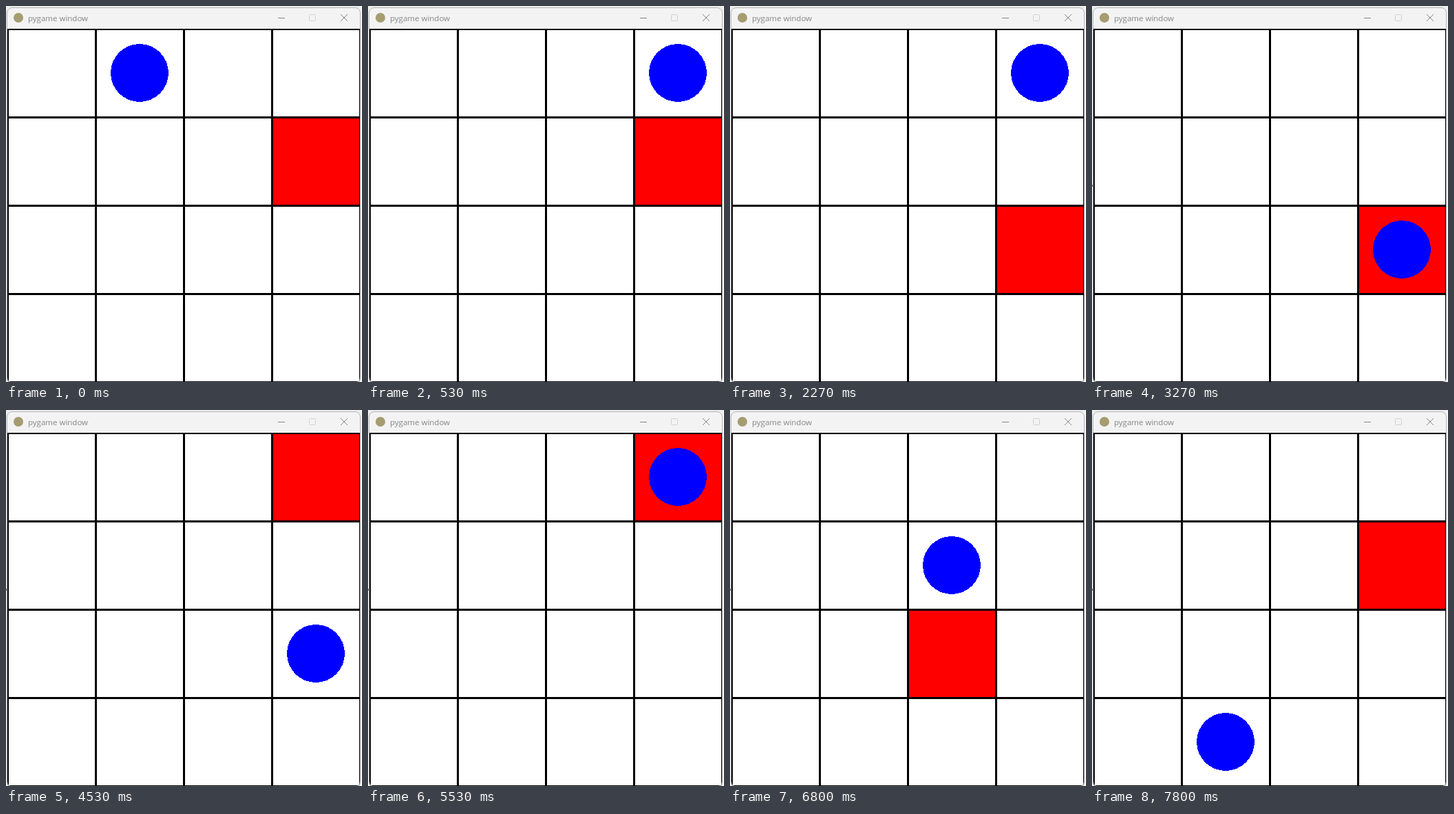
Write an HTML page that moves like this. It is 517 px wide and 545 px high and loops after 8000 ms.

```html
<!DOCTYPE html>
<html lang="en">
<head>
<meta charset="utf-8">
<title>pygame window</title>
<style>
  html, body { margin: 0; width: 100%; height: 100%; overflow: hidden; background: #ededed; }
  svg { display: block; width: 517px; height: 545px; }
  text { font: 11.5px "Open Sans", "Noto Sans", sans-serif; fill: #868686; }
  .crisp { shape-rendering: crispEdges; }
</style>
</head>
<body>
<svg viewBox="0 0 517 545">
  <defs>
    <clipPath id="frame"><rect x="1" y="2" width="514" height="544.5" rx="8"/></clipPath>
  </defs>
  <rect x="515" width="2" height="545" fill="#f5f5f5"/>
  <g clip-path="url(#frame)">
    <rect x="1" y="2" width="514" height="32" fill="#f3f3f3"/>
    <circle cx="18" cy="17" r="7" fill="#a59c70"/>
    <text x="32" y="22">pygame window</text>
    <g fill="none" stroke="#868686">
      <path d="M395 17.5h10"/>
      <rect x="440.5" y="12.5" width="9" height="9" rx="1" stroke="#d2d2d2"/>
      <path d="M486 12l10 10M496 12l-10 10"/>
    </g>
    <svg class="crisp" x="2" y="33" width="512" height="512">
      <rect width="512" height="512" fill="#fff"/>
      <rect id="goal" width="128" height="128" fill="#f00"/>
      <circle id="agent" cx="64" cy="64" r="42" fill="#00f"/>
      <path id="grid" fill="#000"/>
    </svg>
  </g>
  <rect x="1.5" y="2.5" width="513" height="543.5" rx="7.5" fill="none" stroke="#b4b4b4"/>
  <rect id="speck" class="crisp" y="259" width="1" height="3" fill="#555" opacity="0"/>
</svg>
<script>
const LOOP = 8000, CELL = 128;
const $ = id => document.getElementById(id);

// Each episode: goal cell, start cell, and the times of the reset and of every move.
const episodes = [
  { goal: [3, 1], start: [1, 0], times: [0, 130, 530, 1070] },
  { goal: [3, 2], start: [1, 0], times: [1530, 1800, 2270, 2800, 3270] },
  { goal: [3, 0], start: [1, 2], times: [3800, 4000, 4530, 5070, 5530] },
  { goal: [1, 2], start: [1, 1], times: [6070, 6270] },
  { goal: [2, 2], start: [2, 1], times: [6800, 7070] },
  { goal: [3, 1], start: [0, 3], times: [7530, 7800] }
];

// The agent closes the horizontal gap first, then the vertical one.
function move([x, y], [gx, gy]) {
  return x !== gx ? [x + Math.sign(gx - x), y] : [x, y + Math.sign(gy - y)];
}

const key = (time, [x, y]) => ({
  offset: time / LOOP,
  transform: `translate(${x * CELL}px, ${y * CELL}px)`,
  easing: 'step-end'
});

function play(el, keys) {
  const last = { ...keys[keys.length - 1], offset: 1 };
  el.animate([...keys, last], { duration: LOOP, iterations: Infinity });
}

const goalKeys = [], agentKeys = [];
for (const { goal, start, times } of episodes) {
  goalKeys.push(key(times[0], goal));
  let cell = start;
  times.forEach((time, i) => {
    if (i) cell = move(cell, goal);
    agentKeys.push(key(time, cell));
  });
}

let bars = '';
for (let i = 0; i <= 4; i++) {
  const p = i * CELL - 1;
  bars += `M${p} 0h3v512h-3zM0 ${p}h512v3h-512z`;
}
$('grid').setAttribute('d', bars);

play($('goal'), goalKeys);
play($('agent'), agentKeys);
play($('speck'), [
  { offset: 0, opacity: 0, easing: 'step-end' },
  { offset: 3270 / LOOP, opacity: 1, easing: 'step-end' }
]);
</script>
</body>
</html>
```
